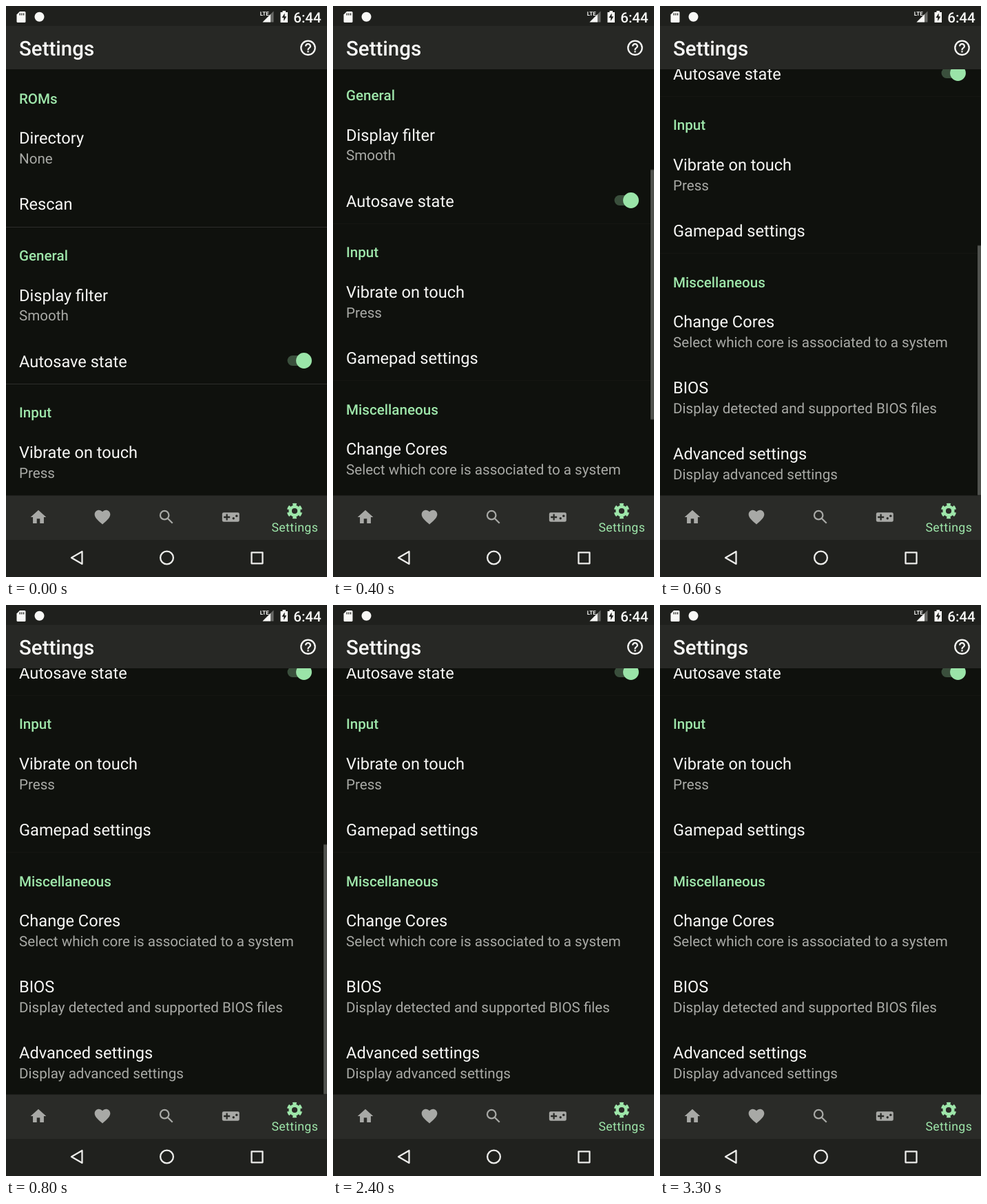
These frames come from a looping animation (466x830 px, 3.5 s). An HTML page:

```html
<!DOCTYPE html>
<html lang="en">
<head>
<meta charset="utf-8">
<title>Settings</title>
<style>
  @property --scroll { syntax: "<number>"; inherits: true; initial-value: 0; }

  html, body { margin: 0; width: 100%; height: 100%; overflow: hidden; background: #0f110d; }
  svg { display: block; }
  text { font-family: Roboto, sans-serif; font-size: 23.6px; fill: #f8f8f6; text-rendering: geometricPrecision; }
  .title { font-size: 29.5px; font-weight: 500; }
  .head { font-size: 20.6px; font-weight: 500; fill: #9ee6aa; }
  .sub { font-size: 20.6px; fill: #a9aaa6; }
  .clock { font-size: 20.6px; font-weight: 500; }
  .lte { font-size: 8px; font-weight: 700; }
  .tab { font-size: 17.7px; letter-spacing: .4px; text-anchor: middle; fill: #9ee6aa; }
  .icons { fill: #a8a9a6; }
  .line { fill: none; stroke: #ececea; stroke-width: 2.3; stroke-linejoin: round; }

  .page { animation: scroll 3.5s step-end infinite; }
  .list { transform: translateY(calc(var(--scroll) * -1px)); }
  .rules { fill: #2d2e2b; animation: dim 3.5s step-end infinite; }
  .bar {
    fill: #50524e;
    transform: translateY(calc(var(--scroll) * .595px));
    animation: bar 3.5s step-end infinite;
  }

  /* one step is 100 ms = 2.857% */
  @keyframes scroll {
    0% { --scroll: 0; }
    2.857% { --scroll: 25; }
    5.714% { --scroll: 110; }
    8.571% { --scroll: 200; }
    11.428% { --scroll: 233; }
    14.285% { --scroll: 305; }
    17.142%, 100% { --scroll: 418; }
  }
  @keyframes dim {
    0% { opacity: 1; }
    2.857%, 100% { opacity: .2; }
  }
  @keyframes bar {
    0% { opacity: 0; }
    2.857% { opacity: 1; }
    25.714% { opacity: .5; }
    28.571%, 100% { opacity: 0; }
  }
</style>
</head>
<body>
<svg width="466" height="830" viewBox="0 0 466 830">
  <defs>
    <clipPath id="view"><rect y="92" width="466" height="619.5"/></clipPath>
  </defs>
  <rect width="466" height="830" fill="#0f110d"/>

  <g class="page" clip-path="url(#view)">
    <g class="list">
      <g class="rules">
        <rect y="321" width="466" height="1"/>
        <rect y="549" width="466" height="1"/>
        <rect y="777" width="466" height="1"/>
      </g>

      <text class="head" x="19" y="141.5">ROMs</text>
      <text x="19" y="200">Directory</text>
      <text class="sub" x="19" y="229">None</text>
      <text x="19" y="296">Rescan</text>

      <text class="head" x="19" y="370">General</text>
      <text x="19" y="428.5">Display filter</text>
      <text class="sub" x="19" y="457.3">Smooth</text>
      <text x="19" y="524.7">Autosave state</text>
      <rect x="408.5" y="508" width="32" height="15" rx="7.5" fill="#3a4f3c"/>
      <circle cx="432.5" cy="515.5" r="11.4" fill="#9ae4a8"/>

      <text class="head" x="19" y="598.3">Input</text>
      <text x="19" y="656.8">Vibrate on touch</text>
      <text class="sub" x="19" y="685.6">Press</text>
      <text x="19" y="753">Gamepad settings</text>

      <text class="head" x="19" y="826.5">Miscellaneous</text>
      <text x="19" y="885">Change Cores</text>
      <text class="sub" x="19" y="914">Select which core is associated to a system</text>
      <text x="19" y="981">BIOS</text>
      <text class="sub" x="19" y="1010">Display detected and supported BIOS files</text>
      <text x="19" y="1077.2">Advanced settings</text>
      <text class="sub" x="19" y="1106">Display advanced settings</text>
    </g>
    <rect class="bar" x="461" y="99.4" width="5" height="363"/>
  </g>

  <!-- status bar -->
  <rect width="466" height="29" fill="#1f201d"/>
  <path d="M20 8H27a1.5 1.5 0 0 1 1.5 1.5V22.5a1.5 1.5 0 0 1-1.5 1.5H17a1.5 1.5 0 0 1-1.5-1.5V12.5z" fill="#f8f8f6"/>
  <path d="M20.2 10.5v3M22.9 10.5v3M25.6 10.5v3" stroke="#1f201d" stroke-width="1.3"/>
  <circle cx="48.5" cy="15.8" r="7" fill="#f8f8f6"/>
  <path d="M388.5 7.5V23.5H372.5z" fill="#686966"/>
  <path d="M384 12V23.5H372.5z" fill="#f8f8f6"/>
  <rect x="368" y="7" width="13" height="8" fill="#1f201d"/>
  <text class="lte" x="368.8" y="14">LTE</text>
  <path d="M401.5 9V7h4.5v2h3v15h-10.5V9z" fill="#f8f8f6"/>
  <path d="M404.6 10.5L400.5 17h2.7v5l4.1-6.7h-2.7z" fill="#1f201d"/>
  <text class="clock" x="417.2" y="23.8">6:44</text>

  <!-- app bar -->
  <rect y="29" width="466" height="63" fill="#272825"/>
  <text class="title" x="19" y="72.3">Settings</text>
  <g transform="translate(438.5 60.8) scale(1.134) translate(-12 -12)" fill="#f8f8f6">
    <circle cx="12" cy="12" r="9" fill="none" stroke="#f8f8f6" stroke-width="2"/>
    <path d="M11 18h2v-2h-2zM12 6c-2.21 0-4 1.79-4 4h2c0-1.1.9-2 2-2s2 .9 2 2c0 2-3 1.75-3 5h2c0-2.25 3-2.5 3-5 0-2.21-1.79-4-4-4z"/>
  </g>

  <!-- tabs -->
  <rect y="711.5" width="466" height="64.5" fill="#2a2b28"/>
  <g class="icons">
    <path transform="translate(47 743) scale(1.134) translate(-12 -12)" d="M10 20v-6h4v6h5v-8h3L12 3 2 12h3v8z"/>
    <path transform="translate(140 743) scale(1.134) translate(-12 -12)" d="M12 21.35l-1.45-1.32C5.4 15.36 2 12.28 2 8.5 2 5.42 4.42 3 7.5 3c1.74 0 3.41.81 4.5 2.09C13.09 3.81 14.76 3 16.5 3 19.58 3 22 5.42 22 8.5c0 3.78-3.4 6.86-8.55 11.54z"/>
    <g transform="translate(233 743) scale(1.134) translate(-12 -12)" fill="none" stroke="#a8a9a6" stroke-width="2">
      <circle cx="9.5" cy="9.5" r="5.5"/>
      <path d="M13.7 13.7l6 6"/>
    </g>
    <g transform="translate(326.3 743) scale(1.134) translate(-12 -12)">
      <rect x="1" y="6" width="22" height="12" rx="2"/>
      <g fill="#2a2b28">
        <path d="M6 8h2v3h3v2H8v3H6v-3H3v-2h3z"/>
        <circle cx="15.5" cy="13.5" r="1.5"/>
        <circle cx="19.5" cy="10.5" r="1.5"/>
      </g>
    </g>
  </g>
  <g transform="translate(419 734) scale(1.134)" fill="none" stroke="#9ee6aa">
    <circle r="5.6" stroke-width="4"/>
    <circle r="8.4" stroke-width="3.2" pathLength="12" stroke-dasharray="1.1 .9" stroke-dashoffset="-.45"/>
  </g>
  <text class="tab" x="419.3" y="763.8">Settings</text>

  <!-- system buttons -->
  <rect y="776" width="466" height="54" fill="#20211e"/>
  <g class="line">
    <path d="M95 802L110.5 793V811z"/>
    <circle cx="233.5" cy="802" r="9.4"/>
    <rect x="356.5" y="794.3" width="16" height="16"/>
  </g>
</svg>
</body>
</html>
```
